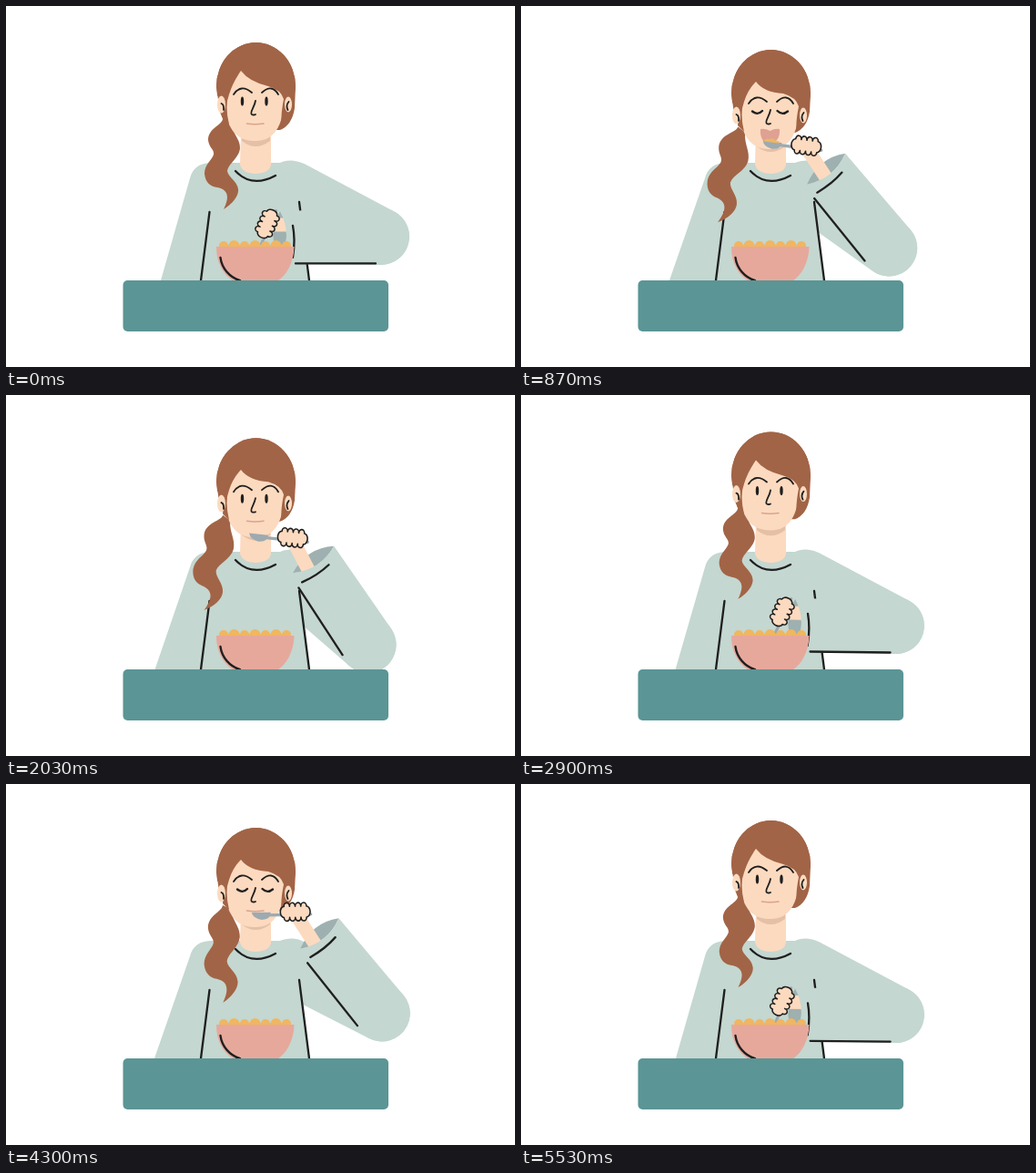
These frames come from a looping animation (559 by 396 pixels, 5.61 s). An HTML page:

```html
<!DOCTYPE html>
<html lang="en">
<head>
<meta charset="utf-8">
<title>Eating from a bowl</title>
<style>
  html, body { margin: 0; width: 100%; height: 100%; overflow: hidden; background: #fff; }
  svg { display: block; width: 559px; height: 396px; }
  .shirt { fill: #c4d7d0; }
  .skin { fill: #fcdabf; }
  .hair { fill: #a26446; }
  .grey { fill: #9fb0b0; }
  .food { fill: #f0b660; }
  .ink { fill: none; stroke: #1f1f1f; stroke-width: 2.3; stroke-linecap: round; }
  .thin { stroke-width: 1.8; }
</style>
</head>
<body>
<svg viewBox="0 0 559 396">
  <!-- body -->
  <path id="torso" class="shirt"/>
  <line id="upperArm" stroke="#c4d7d0" stroke-width="62" stroke-linecap="round"/>
  <path class="ink" d="M223.5 226L214 301M322 215L333 301"/>
  <path class="skin" d="M258 138H291V174Q290 183 274 184Q259 183 257 174Z"/>
  <path id="shade" fill="#e4c0a6" d="M259 138H290V148Q274 160 259 148Z"/>
  <path class="ink" d="M252 181Q270 200 296 186"/>

  <!-- head -->
  <path id="tail" class="hair" d="M238 124C237 131 222 134 222 147C223 156 229 157 228 163C226 169 218 174 218 184C219 194 225 198 232 199C242 201 247 207 239 223C249 217 256 208 255 201C254 192 244 188 243 181C244 173 256 167 257 156C257 145 249 141 247 128Z"/>
  <path id="backHair" class="hair"/>
  <path id="face" class="skin" d="M240 92C239 126 247 148 274 148C297 148 306 128 306 92L302 68H250Z"/>
  <path id="frontHair" class="hair"/>
  <g id="ears">
    <ellipse class="skin" cx="236.5" cy="108" rx="4.5" ry="9.5"/>
    <ellipse class="skin" cx="310" cy="108" rx="4" ry="8.5"/>
    <path class="ink thin" d="M236.5 107Q239.5 108 239 114M310.500 105Q307 109 309.5 114"/>
  </g>
  <g id="features">
    <path class="ink thin" d="M250 97Q258 85 270 95M281 95Q292 85 299 97"/>
    <g id="open" fill="#1f1f1f">
      <ellipse cx="259.5" cy="104.5" rx="1.7" ry="5"/>
      <ellipse cx="286" cy="104.5" rx="1.7" ry="5"/>
    </g>
    <path id="closed" class="ink" d="M254 105.5Q260 110.500 265 105M281.5 105Q287 110.500 293 105.5"/>
    <path class="ink thin" d="M274 104C273 111 267 117 270 119Q272 120 274 119"/>
    <path id="lips" fill="none" stroke="#dba38e" stroke-width="1.5" stroke-linecap="round" d="M264.5 129Q273 130.5 283 129"/>
    <path id="mouth" fill="#dfa193" d="M263 125Q268 124 273.5 127Q279 124 284 125C285 135 279 141 273.5 141C267 141 262 135 263 125Z"/>
  </g>

  <!-- forearm, pivot at the elbow, pointing left -->
  <g id="forearm">
    <path class="grey" d="M-111 -28Q-126 -2 -111 26Q-97 -2 -111 -28Z"/>
    <line id="wrist" stroke="#fcdabf" stroke-width="15"/>
    <g id="hand">
      <path fill="none" stroke="#9daab0" stroke-width="3.2" stroke-linecap="round" d="M17 3H-31"/>
      <path fill="#9daab0" d="M-48 0H-27Q-27 8 -37 8Q-46 7 -48 0Z"/>
      <path id="bite" class="food" d="M-47 1Q-45 -4 -41 -2Q-37 -5 -33 -1Q-30 -2 -30 1Z"/>
      <path id="fist" class="skin" stroke="#1f1f1f" stroke-width="1.6" stroke-linejoin="round"/>
    </g>
    <path class="shirt" d="M0 -31L-111 -28Q-97 -2 -111 26L-94 30L0 31A31 31 0 0 0 0 -31Z"/>
    <path class="ink" d="M-6 29.5H-94M-97 -12Q-94 4 -97 23"/>
  </g>

  <!-- bowl and table -->
  <g id="cereal" class="food"><rect x="234" y="262" width="79" height="4"/></g>
  <path fill="#e7a89c" d="M231 264H316.5C316 282 308 295 298 302H250C238 294 231 282 231 264Z"/>
  <path class="ink" d="M235.5 276C237 288 246 298 257 301"/>
  <rect x="128.5" y="301" width="291.5" height="56" rx="5" fill="#5b9595"/>
</svg>
<script>
const $ = id => document.getElementById(id);
const set = (id, attrs) => { for (const k in attrs) $(id).setAttribute(k, attrs[k]); };
const show = (id, on) => set(id, { visibility: on ? 'visible' : 'hidden' });
const drop = (id, y) => set(id, { transform: `translate(0 ${y})` });

const LOOP = 5610, BITE = LOOP / 2;
const SHOULDER = { x: 313, y: 200.5 }, UPPER = 112;

// Angles in degrees; reach and off place the hand along and across the forearm
const rest = { elbow: 27.9, fore: 0, reach: 125, off: -14, turn: -66 };
const eat = { elbow: 35.5, fore: 51, reach: 144.5, off: 0, turn: 7 };
const lift = { elbow: 23.3, fore: 50, reach: 147, off: 5, turn: -3 };
const lower = { elbow: 41, fore: 56.8, reach: 143.5, off: 5, turn: 6 };

// 0 before a, 1 after b, eased between
function ease(a, b, t) {
  const s = Math.min(1, Math.max(0, (t - a) / (b - a)));
  return s * s * (3 - 2 * s);
}

function blend(from, to, s) {
  const pose = {};
  for (const k in from) pose[k] = from[k] + (to[k] - from[k]) * s;
  return pose;
}

function armPose(t) {
  if (t < 870) return blend(rest, eat, ease(40, 870, t));
  if (t < 1270) return blend(eat, lift, ease(870, 1270, t));
  if (t < 2030) return blend(lift, lower, ease(1270, 2030, t));
  return blend(lower, rest, ease(2030, BITE - 40, t));
}

set('fist', { d: 'M-12.4 -6' + 'a3.1 4 0 0 1 6.2 0'.repeat(4) + 'a4 6 0 0 1 0 12'
  + 'a3.1 4 0 0 1 -6.2 0'.repeat(4) + 'a4 6 0 0 1 0 -12Z' });
for (let i = 0; i < 7; i++) {
  $('cereal').innerHTML += `<circle cx="${239 + 11.5 * i}" cy="263" r="${5 + i % 2}"/>`;
}

function drawArm(t, up) {
  const { elbow, fore, reach, off, turn } = armPose(t);
  const a = elbow * Math.PI / 180;
  const x = SHOULDER.x + UPPER * Math.cos(a), y = SHOULDER.y + UPPER * Math.sin(a);
  set('upperArm', { x1: SHOULDER.x, y1: SHOULDER.y, x2: x, y2: y });
  set('forearm', { transform: `translate(${x} ${y}) rotate(${fore})` });
  set('hand', { transform: `translate(${-reach} ${off}) rotate(${turn - fore})` });
  set('wrist', { x1: -96, y1: off + 1 + 5 * up, x2: -reach, y2: off + 1 });
  show('bite', t < 1000);
}

function drawHead(t, up) {
  const sway = ease(0, 900, t) - ease(900, 1450, t) + ease(1450, 1900, t) - ease(1900, BITE, t);
  const gape = ease(420, 620, t) - ease(930, 1080, t);
  const shut = t > 400 && t < 1800;

  drop('shade', 6 * up);
  drop('face', 9 * up);
  drop('ears', 12 * up);
  drop('features', 10 * up);
  set('tail', { transform: `translate(240 ${125 + 9 * up}) rotate(${12.5 * sway}) scale(1 ${1 + 0.08 * up}) translate(-240 -125)` });

  const d = 8 * up, f = 12 * up, end = 136 + 3 * up;
  const dome = `M231 ${88 + d}A43.5 48 0 0 1 318 ${88 + d}`;
  set('backHair', { d: `${dome}L317 ${112 + d / 2}Q314 ${end - 5} 301 ${end}H247Q236 126 234 ${110 + d}Z` });
  set('frontHair', { d: `${dome}L316 ${104 + d}Q308 ${100 + d} 307 ${112 + d}L303 ${end}`
    + `Q301 ${122 + d} 305 ${102 + d}Q302 ${92 + d} 288 ${88 + d}Q267 ${83 + f} 258 ${71 + f}`
    + `Q249 ${84 + d} 245 ${97 + d}Q240 ${109 + d} 245 ${130 + d}L238 ${123 + d}`
    + `Q240 ${104 + d} 232 ${98 + d}Z` });

  show('open', !shut);
  show('closed', shut);
  show('lips', gape < 0.1);
  show('mouth', gape >= 0.1);
  set('mouth', { transform: `translate(0 ${127 * (1 - gape)}) scale(1 ${gape})` });
}

function draw(t) {
  const up = ease(0, 700, t) - ease(1880, 2750, t);
  set('torso', { d: `M262 172H224Q206 173 202 189L${170 - 7 * up} 301H333L322 214L324 172Z` });
  drawArm(t, up);
  drawHead(t, up);
}

function tick() {
  draw(performance.now() % LOOP % BITE);
  requestAnimationFrame(tick);
}
tick();
</script>
</body>
</html>
```
